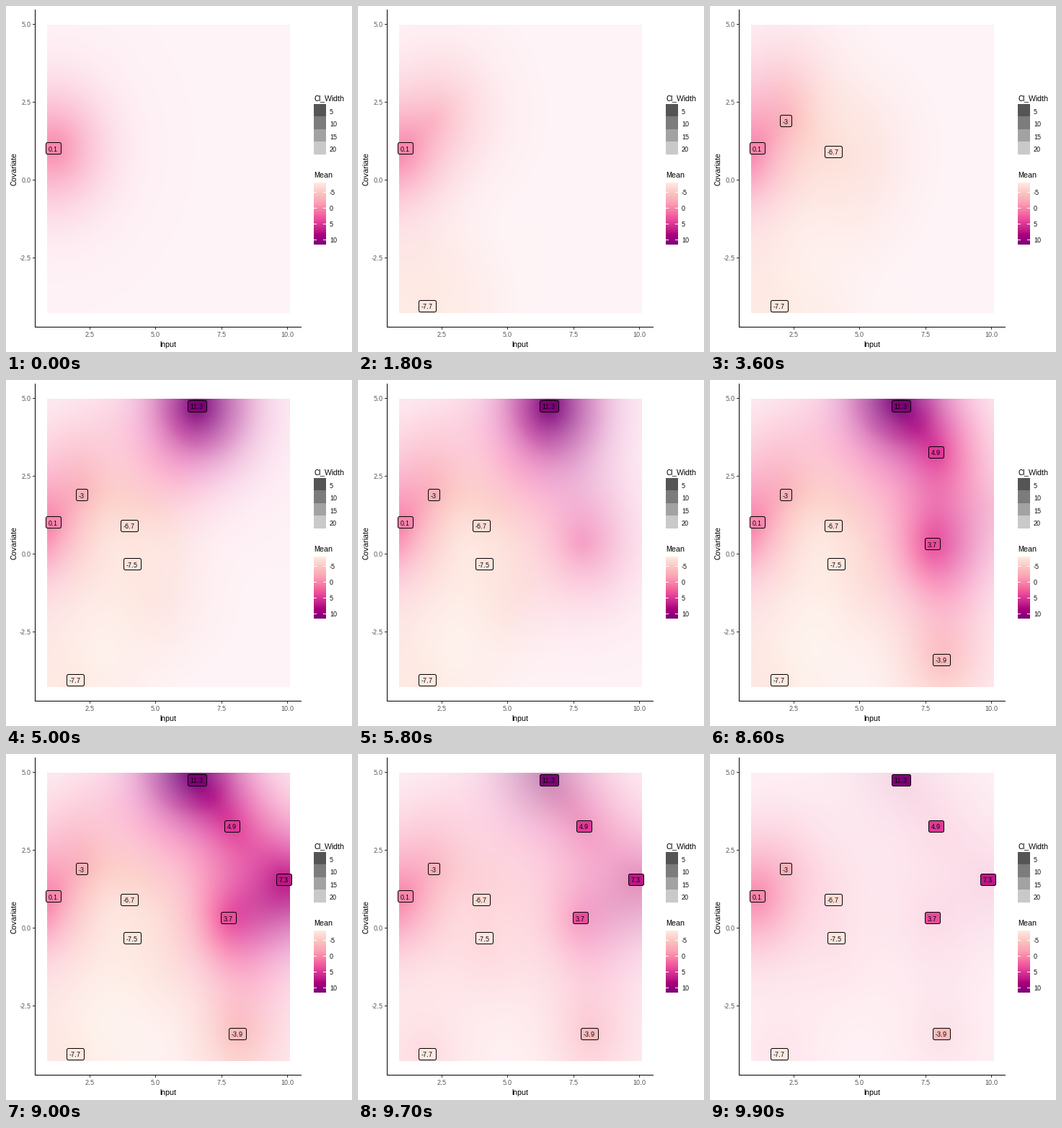
These frames come from a looping animation (480x480 px, 10000 ms). A matplotlib script:

```python
import numpy as np
import matplotlib.pyplot as plt
from matplotlib.animation import FuncAnimation
from matplotlib.patches import FancyBboxPatch, Rectangle

SIZE, DPI = 480, 100
PX = 72 / DPI                      # points per pixel
LEFT, RIGHT, TOP, BOTTOM = 57, 394, 26, 426
UNIT = np.array([36.55, 43.2])     # pixels per data unit
GRID, LENGTH, NOISE = 40, 2.2, 1e-3
LOW, HIGH = -7.9, 11.6
HOLD, STEP, STATES = 5, 10, 10

# Observations in sampling order: pixel x, pixel y, value
POINTS = [(65.5, 197, 0.1), (96.5, 416, -7.7), (105.5, 159, -3), (171.5, 202, -6.7),
          (175, 255, -7.5), (265, 36, 11.3), (308.5, 227, 3.7), (314, 100, 4.9),
          (321, 388, -3.9), (385.5, 174.5, 7.3)]
RAMP = ["feebe2", "fcc5c0", "fa9fb5", "f768a1", "dd3497", "ae017e", "7a0177"]

plt.rcParams.update({"font.family": "Liberation Sans",
                     "text.hinting": "native", "text.hinting_factor": 1})

TO_XYZ = np.array([[0.4124564, 0.3575761, 0.1804375],
                   [0.2126729, 0.7151522, 0.0721750],
                   [0.0193339, 0.1191920, 0.9503041]])
WHITE = TO_XYZ.sum(axis=1)


def rgb_to_lab(rgb):
    lin = np.where(rgb <= 0.04045, rgb / 12.92, ((rgb + 0.055) / 1.055) ** 2.4)
    t = lin @ TO_XYZ.T / WHITE
    f = np.where(t > 0.008856, np.cbrt(t), 7.787 * t + 16 / 116)
    x, y, z = np.moveaxis(f, -1, 0)
    return np.stack([116 * y - 16, 500 * (x - y), 200 * (y - z)], axis=-1)


def lab_to_rgb(lab):
    l, a, b = np.moveaxis(lab, -1, 0)
    y = (l + 16) / 116
    f = np.stack([y + a / 500, y, y - b / 200], axis=-1)
    t = np.where(f > 0.2069, f ** 3, (f - 16 / 116) / 7.787)
    lin = np.clip((t * WHITE) @ np.linalg.inv(TO_XYZ).T, 0, 1)
    rgb = np.where(lin <= 0.0031308, lin * 12.92, 1.055 * lin ** (1 / 2.4) - 0.055)
    return np.clip(rgb, 0, 1)


STOPS = rgb_to_lab(np.array([[int(h[i:i + 2], 16) / 255 for i in (0, 2, 4)] for h in RAMP]))


def fill_lab(value):
    pos = np.clip((np.asarray(value, float) - LOW) / (HIGH - LOW), 0, 1)
    knots = np.linspace(0, 1, len(STOPS))
    return np.stack([np.interp(pos, knots, STOPS[:, k]) for k in range(3)], axis=-1)


def kernel(a, b):
    d2 = ((a[:, None] - b[None]) ** 2).sum(axis=-1)
    return np.exp(-d2 / (2 * LENGTH ** 2))


mid = (np.arange(GRID) + 0.5) / GRID
gx, gy = np.meshgrid(LEFT + (RIGHT - LEFT) * mid, TOP + (BOTTOM - TOP) * mid)
cells = np.column_stack([gx.ravel(), gy.ravel()]) / UNIT
obs = np.array(POINTS)


def posterior(n):
    """Fill (Lab) and opacity of the surface given the first n observations."""
    pts = obs[:n, :2] / UNIT
    cross = kernel(cells, pts)
    weights = np.linalg.solve(kernel(pts, pts) + NOISE * np.eye(n), cross.T)
    mean = weights.T @ obs[:n, 2]
    sd = np.sqrt(np.clip(1 - (cross * weights.T).sum(axis=1), 0, 1))
    return fill_lab(mean).reshape(GRID, GRID, 3), (1 - 0.9 * sd).reshape(GRID, GRID, 1)


surfaces = [posterior(n + 1) for n in range(STATES)]


def surface_image(frame):
    state, k = divmod(frame, STEP)
    u = max(0, k - HOLD) / (STEP - HOLD)
    (lab0, a0), (lab1, a1) = surfaces[state], surfaces[(state + 1) % STATES]
    alpha = a0 + (a1 - a0) * u
    return 1 - alpha * (1 - lab_to_rgb(lab0 + (lab1 - lab0) * u))


fig = plt.figure(figsize=(SIZE / DPI, SIZE / DPI), dpi=DPI, facecolor="white")
ax = fig.add_axes([0, 0, 1, 1])


def bar(x, y, w, h, color="black", z=3):
    ax.add_patch(Rectangle((x, y), w, h, fc=color, ec="none", lw=0, zorder=z))


def text(x, y, s, px=9, color="black", ha="left", **kw):
    return ax.text(x, y, s, fontsize=px * PX, color=color, ha=ha, va="baseline", **kw)


def value_label(x, y, value):
    s = f"{value:g}"
    em = sum({".": 0.278, "-": 0.333}.get(c, 0.556) for c in s)
    w, h = round(10 * em + 6.8), 16
    # Half-pixel corners keep the one-pixel outline crisp
    x0, y0 = np.floor(x - w / 2) + 0.5, np.floor(y - h / 2) + 0.5
    box = FancyBboxPatch((x0, y0), w, h, boxstyle="round,pad=0,rounding_size=2.3",
                         facecolor=lab_to_rgb(fill_lab(value)), edgecolor="black",
                         lw=PX, zorder=5)
    ax.add_patch(box)
    return box, text(x0 + 3, y0 + 12, s, zorder=6)


surface = ax.imshow(surface_image(0), extent=(LEFT, RIGHT, BOTTOM, TOP),
                    interpolation="bilinear", aspect="auto", zorder=1)

# Axes
bar(40, 5, 1, 441)
bar(40, 445, 370, 1)
for i in range(4):
    x, y = round(116 + 91.4 * i), 25 + 108 * i
    bar(x, 446, 1, 3, "#333333")
    bar(37, y, 3, 1, "#333333")
    text(x, 459, f"{2.5 * (i + 1):.1f}", color="#4d4d4d", ha="center")
    text(35, y + 4, f"{5 - 2.5 * i:.1f}", color="#4d4d4d", ha="right")
text(224.5, 473, "Input", 11, ha="center")
text(15, 226, "Covariate", 11, ha="center", rotation=90, rotation_mode="anchor")

# Opacity legend
text(427, 131, "CI_Width", 11)
for i, grey in enumerate((85, 124, 162, 201)):
    y = round(136 + 17.4 * i)
    bar(427, y, 17, round(136 + 17.4 * (i + 1)) - y, str(grey / 255))
    text(449, y + 14, str(5 * (i + 1)))

# Fill legend
text(427, 238, "Mean", 11)
ramp = lab_to_rgb(fill_lab(np.linspace(LOW, HIGH, 300)))[:, None]
ax.imshow(ramp, extent=(427, 444, 331, 245), aspect="auto", zorder=1)
for v in (-5, 0, 5, 10):
    y = round(245 + 86 * (v - LOW) / (HIGH - LOW))
    bar(427, y, 4, 1, "white")
    bar(440, y, 4, 1, "white")
    text(449, y + 4, str(v))

labels = [value_label(*p) for p in POINTS]
ax.set_xlim(0, SIZE)
ax.set_ylim(SIZE, 0)
ax.axis("off")


def update(frame):
    surface.set_data(surface_image(frame))
    for i, parts in enumerate(labels):
        for part in parts:
            part.set_visible(i <= frame // STEP)
    return [surface]


anim = FuncAnimation(fig, update, frames=STATES * STEP, interval=100,
                     repeat=True, repeat_delay=0)
plt.show()
```
